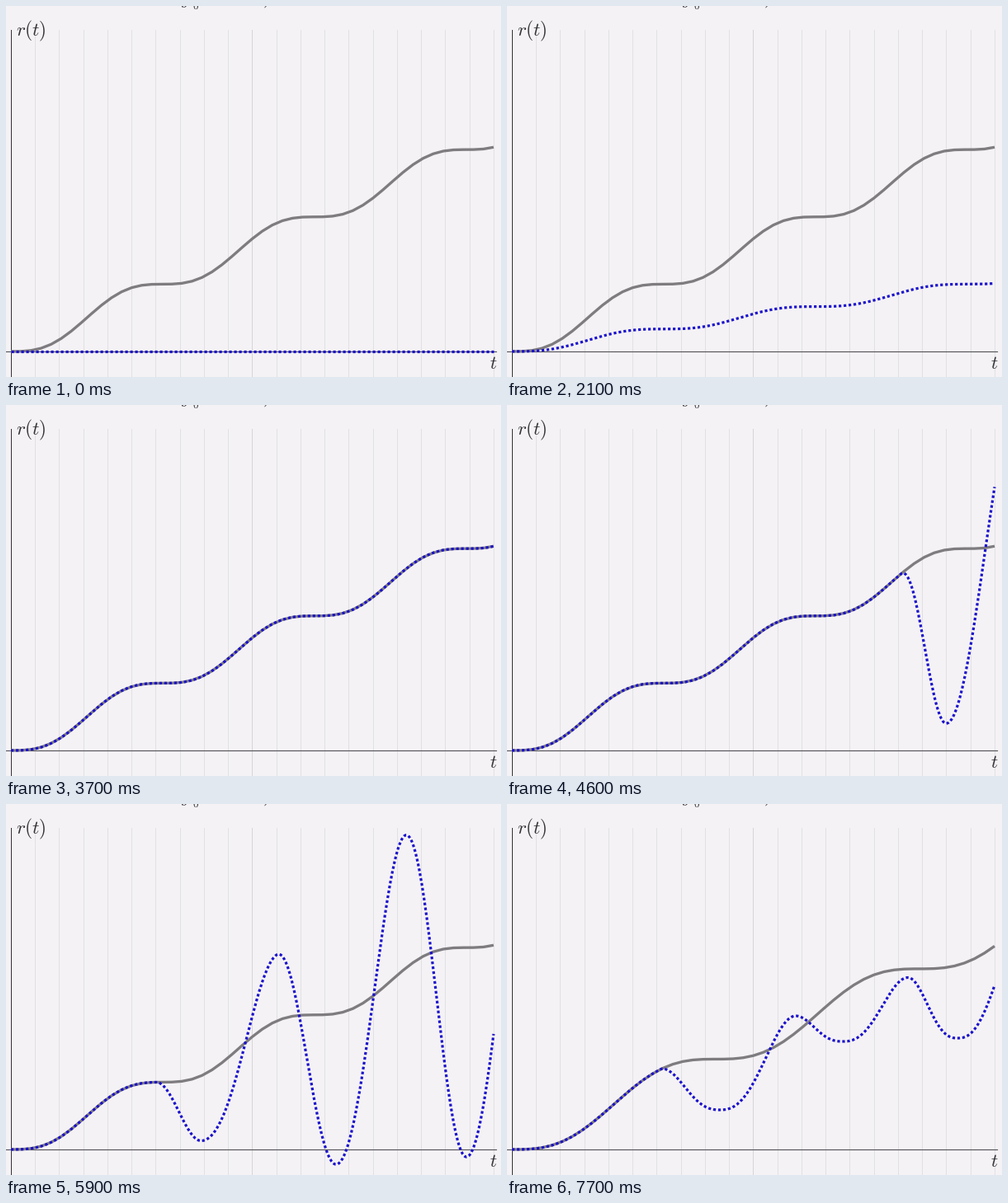
A matplotlib script for the animation above (8000 ms loop, 600 px wide and 450 px high).

```python
import numpy as np
import matplotlib.pyplot as plt
from matplotlib.animation import FuncAnimation

W, H, DPI = 600, 450, 100
PX = 72 / DPI                      # one pixel in points
X0, X1, BASE = 6, 591, 419         # plot edges and height of the t axis
SLOPE = 0.4435                     # mean climb of r(t)
FAST, SLOW = 184, 247              # period of r(t) in pixels
SWITCH = 182                       # where tracking is finally lost
BG, INK, GREY, BLUE = "#f4f2f5", "#333236", "#7f7c80", "#1a10cc"

# Turning points: pixels after the switch, and height relative to r(t)
WILD_X = np.array([0, 55, 146, 218, 299, 376, 461])
WILD_Y = np.array([1, 0.117, 1.515, -0.11, 1.743, -0.037, 1.8])
# Turning points: position and height above the axis
MILD_X = np.array([188, 258, 350, 407, 486, 546, 628])
MILD_Y = np.array([98, 48, 162, 131, 208.5, 135, 275])

plt.rcParams["mathtext.fontset"] = "cm"

xs = np.linspace(X0, X1, 391)
knots = np.linspace(X0, X1, 49)


def climb(x, period):
    """Height of r(t) above the axis."""
    u = x - X0
    return SLOPE * (u - period / (2 * np.pi) * np.sin(2 * np.pi * u / period))


def swing(x, turn_x, turn_y, bend=1):
    """Cosine waves between turning points; bend > 1 widens the troughs."""
    i = np.clip(np.searchsorted(turn_x, x) - 1, 0, len(turn_x) - 2)
    a, b = turn_y[i], turn_y[i + 1]
    p = np.clip((x - turn_x[i]) / (turn_x[i + 1] - turn_x[i]), 0, 1)
    p = np.where(b > a, p, 1 - p) ** bend
    return np.minimum(a, b) + abs(b - a) * (1 - np.cos(np.pi * p)) / 2


def lose(switch):
    """Follow r(t) up to the switch, then swing around it, wider if late."""
    late = (switch - SWITCH) / 295
    turn_y = WILD_Y * (1 + 0.15 * late)
    turn_y[0] = 1
    tau = xs - switch
    return climb(xs, FAST) * np.where(tau > 0, swing(tau, WILD_X, turn_y), 1)


def track(n):
    """Height of the dotted curve in frame n."""
    if n >= 73:
        free = swing(xs, MILD_X, MILD_Y, 1.25)
        return np.where(xs > MILD_X[0], free, climb(xs, SLOW))
    if n <= 41:
        return np.clip((n - 17) / 12, 0, 1) * climb(xs, FAST)
    return lose(X1 - (X1 - SWITCH) * min((n - 41) / 18, 1))


fig = plt.figure(figsize=(W / DPI, H / DPI), dpi=DPI, facecolor=BG)
ax = fig.add_axes([0, 0, 1, 1])
ax.set_xlim(0, W)
ax.set_ylim(H, 0)
ax.axis("off")


def line(x, y, color, width, **kw):
    return ax.plot(x, y, color=color, lw=width * PX, **kw)[0]


def label(x, y, text, size):
    ax.text(x, y, text, fontsize=size * PX, color=INK, va="baseline")


for k in range(1, 21):
    x = X0 + 29.25 * k - 0.1
    line([x, x], [29, H], "#d6d5d8" if k == 10 else "#e1e0e3", 1)
line([0, 594], [BASE, BASE], "#59585c", 1.2)
line([X0, X0], [29, H], INK, 1)

label(12.3, 36.5, "$r(t)$", 23.2)
label(586, 440.3, "$t$", 23)

# lower edge of a formula scrolled past the top
label(211, -1.5, "$y$", 20)
label(226.5, 3.5, "$0$", 13)
label(311, -3, "$)$", 22)

grey = line(knots, knots, GREY, 3.3, solid_joinstyle="round", solid_capstyle="butt")
DOT = 3.2
blue = line(xs, xs, BLUE, DOT, dashes=(3.2 / DOT, 2.8 / DOT), dash_capstyle="butt")


def draw(n):
    grey.set_ydata(BASE - climb(knots, SLOW if n >= 73 else FAST))
    blue.set_ydata(BASE - track(n))
    return grey, blue


anim = FuncAnimation(fig, draw, frames=80, interval=100, repeat=True, repeat_delay=0)
plt.show()
```
